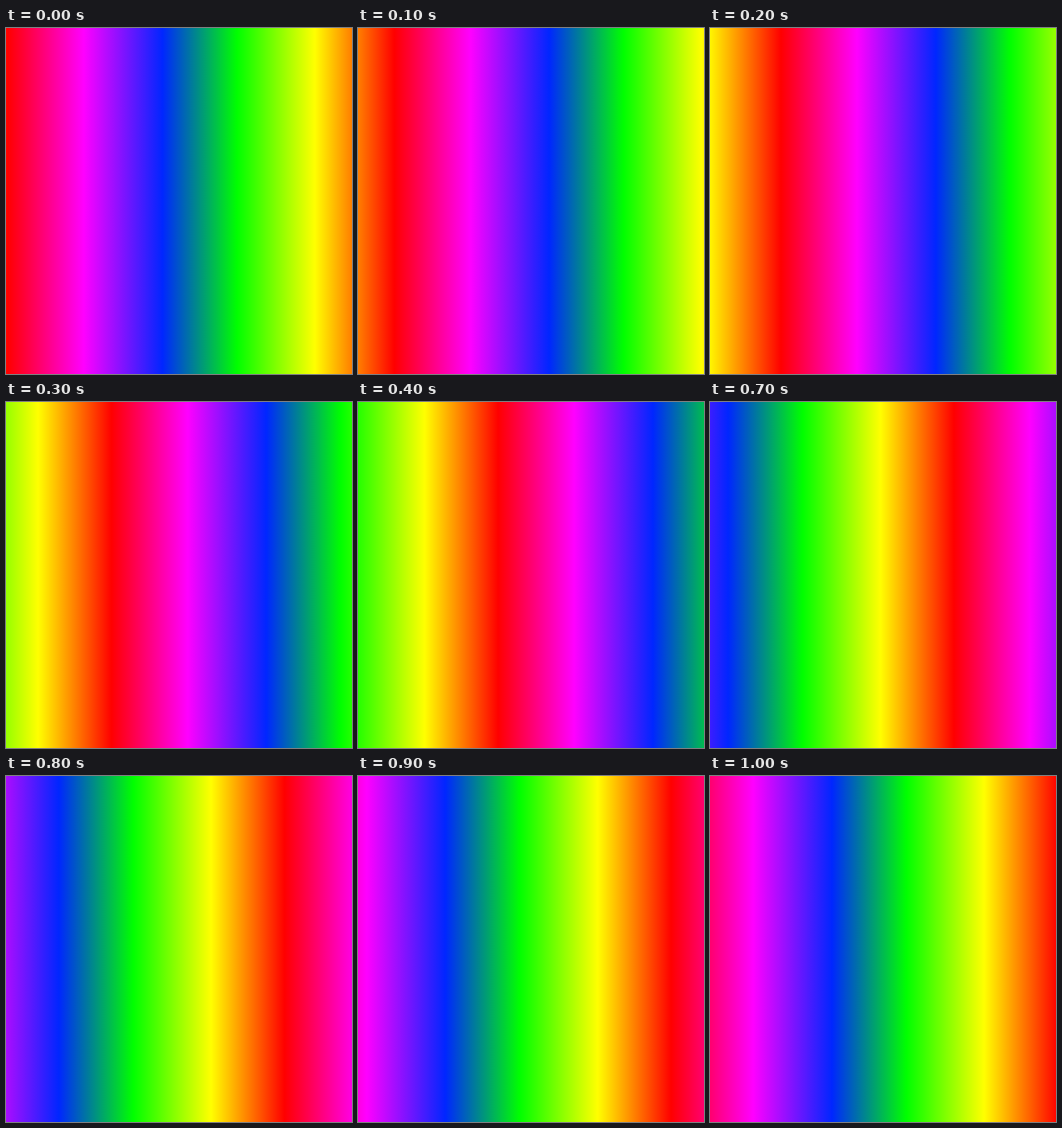
Write an HTML page that moves like this. It is 400 px wide and 400 px high and loops after 1100 ms.

```html
<!DOCTYPE html>
<html>
<head>
<meta charset="utf-8">
<style>
  html, body { margin: 0; height: 100%; overflow: hidden; }
  body {
    background: linear-gradient(90deg,
      #f00 0, #f0f 88px, #0026ff 179px, #0f0 265px, #ff0 355px, #f00 440px)
      2px 0 / 440px 100% repeat-x;
  }
</style>
</head>
<body>
<script>
  const STEP_MS = 100, STEPS = 11, SHIFT = 40, OFFSET = 2;
  const start = performance.now();

  // The rainbow jumps right by one shift per step; eleven shifts make a full period.
  function draw() {
    const step = Math.floor((performance.now() - start) / STEP_MS) % STEPS;
    document.body.style.backgroundPositionX = OFFSET + step * SHIFT + 'px';
    requestAnimationFrame(draw);
  }
  draw();
</script>
</body>
</html>
```
